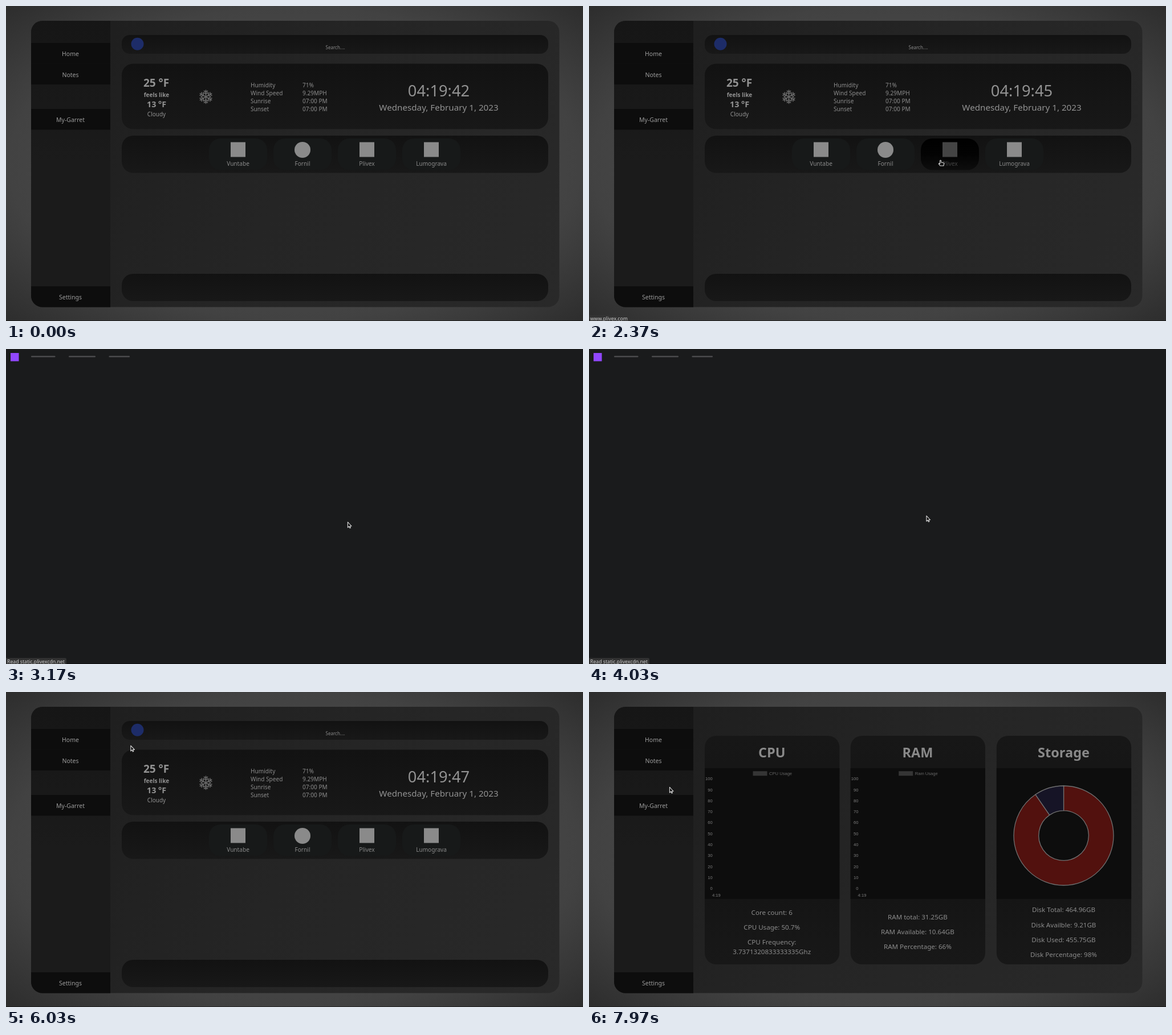
An HTML page with a canvas that plays this animation: 1012 px wide and 554 px high, repeating every 8000 ms.

```html
<!DOCTYPE html>
<html lang="en">
<head>
<meta charset="utf-8">
<title>Dashboard</title>
<style>
html, body { margin: 0; width: 100%; height: 100%; overflow: hidden; background: #333; }
canvas { display: block; }
</style>
</head>
<body>
<canvas id="stage" width="1012" height="554"></canvas>
<script>
const LOOP = 8000;
const SANS = '"Noto Sans", sans-serif';
const CHART = '"Liberation Sans", Arial, sans-serif';
const c = document.getElementById('stage').getContext('2d');

// Pointer stops: time, x, y
const PATH = [
  [230, 22, 262], [870, 660, 252], [1570, 660, 252], [1900, 640, 264],
  [2250, 616.5, 271], [2570, 616.5, 271], [2730, 599, 304], [3570, 599, 304],
  [4030, 591.5, 293], [4930, 591.5, 293], [5230, 430, 420], [5630, 250, 92],
  [5770, 250, 92], [5950, 226, 86], [6470, 109.5, 207], [7000, 109.5, 207],
  [7430, 143, 169], [7900, 143, 169], [7970, 141, 167]
];
const TICKS = [570, 1570, 2370, 4570, 5200, 6200];
const LINKS = ['Vuntabe', 'Fornil', 'Plivex', 'Lumograva'];
const NAV = [['Home', 65, 88], ['Notes', 101.5, 124.5], ['My-Garret', 181, 204], ['Settings', 493, 516]];

const lerp = (a, b, k) => a + (b - a) * k;
const ramp = (t, a, b) => Math.min(1, Math.max(0, (t - a) / (b - a)));
const easeOut = k => 1 - (1 - k) ** 4;
const inside = (p, x, y, w, h) => p.x >= x && p.x <= x + w && p.y >= y && p.y <= y + h;

function pointer(t) {
  const i = Math.max(1, PATH.findIndex(s => s[0] > t));
  const [a, b] = t >= 7970 ? [PATH.at(-1), PATH.at(-1)] : [PATH[i - 1], PATH[i]];
  const k = a === b ? 0 : ramp(t, a[0], b[0]), e = k * k * (3 - 2 * k);
  return { x: lerp(a[1], b[1], e), y: lerp(a[2], b[2], e) };
}

function vertical(y, h, ...colors) {
  const g = c.createLinearGradient(0, y, 0, y + h);
  colors.forEach((col, i) => g.addColorStop(i / (colors.length - 1), col));
  return g;
}

function box(x, y, w, h, r, fill) {
  c.beginPath();
  c.roundRect(x, y, w, h, r);
  c.fillStyle = fill;
  c.fill();
}

function disc(x, y, r, fill) {
  c.beginPath();
  c.arc(x, y, r, 0, 2 * Math.PI);
  c.fillStyle = fill;
  c.fill();
}

function text(s, x, y, size, color = '#929292', align = 'center', weight = 400, family = SANS) {
  c.font = `${weight} ${size}px ${family}`;
  c.textAlign = align;
  c.fillStyle = color;
  c.fillText(s, x, y);
}

function frame(p) {
  c.save();
  c.scale(1012, 554);
  const g = c.createRadialGradient(.5, .5, 0, .5, .5, .7071);
  g.addColorStop(0, '#555');
  g.addColorStop(.7, '#424242');
  g.addColorStop(1, '#2d2d2d');
  c.fillStyle = g;
  c.fillRect(0, 0, 1, 1);
  c.restore();

  const panel = c.createLinearGradient(44, 26, 970, 529);
  panel.addColorStop(0, '#1d1d1d');
  panel.addColorStop(.5, '#252525');
  panel.addColorStop(1, '#292929');
  box(44, 26, 926.5, 503.5, 20, panel);
  box(44, 26, 139, 503.5, [20, 0, 0, 20], vertical(26, 503, '#161616', '#1b1b1b', '#1b1b1b'));
  NAV.forEach(([label, y, base], i) => {
    const hot = inside(p, 44, y, 139, 36.5);
    box(44, y, 139, 36.5, i === 3 ? [0, 0, 0, 20] : 0,
      hot ? vertical(y, 36.5, '#000', '#020202', '#141414') : '#0d0d0d');
    text(label, 113, base, 10.5, '#9c9c9c');
  });
}

function snowflake(x, y) {
  c.save();
  c.translate(x, y);
  c.strokeStyle = '#666';
  c.lineWidth = 1.7;
  c.lineCap = 'round';
  c.beginPath();
  for (let i = 0; i < 6; i++) {
    c.moveTo(0, 0);
    c.lineTo(0, -11.6);
    for (const [d, s] of [[5, 3.6], [8.3, 3]]) {
      c.moveTo(-s, -d - s * .65);
      c.lineTo(0, -d);
      c.lineTo(s, -d - s * .65);
    }
    c.rotate(Math.PI / 3);
  }
  c.stroke();
  c.restore();
}

function home(t, p) {
  const bar = (y, h, r) => box(203, y, 748, h, r, vertical(y, h, '#121212', '#181818'));
  bar(51, 33, 14);
  disc(230.5, 66.7, 11, '#1d2c68');
  text('Search....', 577.5, 76, 8, '#8a8a8a');

  bar(101.5, 115, 20);
  text('25 °F', 263.5, 142, 19, '#929292', 'center', 700);
  text('feels like', 264, 159.5, 10, '#929292', 'center', 700);
  text('13 °F', 264, 178.3, 14.3, '#929292', 'center', 700);
  text('Cloudy', 264, 194, 10);
  snowflake(350.5, 159.7);
  [['Humidity', '71%'], ['Wind Speed', '9.29MPH'], ['Sunrise', '07:00 PM'], ['Sunset', '07:00 PM']]
    .forEach(([name, value], i) => {
      text(name, 429, 142.6 + 14 * i, 10.1, '#8c8c8c', 'left');
      text(value, 520, 142.6 + 14 * i, 10.1, '#8c8c8c', 'left');
    });
  const seconds = 42 + TICKS.filter(s => t >= s).length;
  text('04:19:' + seconds, 759, 159, 27.3);
  text('Wednesday, February 1, 2023', 759, 184.3, 15.2);

  bar(228, 65.5, 20);
  LINKS.forEach((name, i) => {
    const x = 407 + 113 * i;
    const hot = inside(p, x - 51, 233, 102, 55) && t < 4570;
    const color = hot && t >= 2250 ? '#444' : hot ? '#777' : '#8a8a8a';
    box(x - 51, 233, 102, 55.5, 20, hot ? vertical(233, 55, '#000', '#030303', '#0d0d0d') : '#171919');
    if (i === 1) disc(x, 253, 14, color);
    else box(x - 13, 239.5, 26, 26, 0, color);
    text(name, x, 280.6, 10.1, color);
  });
  bar(471, 48, 20);
}

function lineChart(x, label, loaded) {
  box(x + 84.5, 139.3, 25, 8, 0, '#353535');
  text(label, x + 113, 145.6, 7.6, '#666', 'left', 400, CHART);
  const step = loaded ? 19.3 : 20.4;
  for (let i = 0; i <= 10; i++)
    text(100 - 10 * i, x + 13.7, 155.2 + step * i, 7.6, '#7c7c7c', 'right', 400, CHART);
  if (loaded) text('4:19', x + 20.3, 359.6, 7.6, '#7c7c7c', 'center', 400, CHART);
}

function slice(from, to, fill) {
  const turn = k => (k - .25) * 2 * Math.PI;
  c.beginPath();
  c.arc(832.5, 252.5, 87.5, turn(from), turn(to));
  c.arc(832.5, 252.5, 43.8, turn(to), turn(from), true);
  c.closePath();
  c.fillStyle = fill;
  c.fill();
  c.strokeStyle = '#707070';
  c.lineWidth = 1.3;
  c.stroke();
}

function server(t) {
  const disk = t >= 7470, ram = t >= 7530, cpu = t >= 7590;
  const cards = [
    [203, 'CPU', cpu
      ? ['Core count: 6', 'CPU Usage: 50.7%', 'CPU Frequency:', '3.7371320833333335Ghz']
      : ['Core count:', 'CPU Usage: %', 'CPU Frequency: Ghz']],
    [458.7, 'RAM', ram
      ? ['RAM total: 31.25GB', 'RAM Available: 10.64GB', 'RAM Percentage: 66%']
      : ['RAM total: GB', 'RAM Available: GB', 'RAM Percentage: %']],
    [714.8, 'Storage', disk
      ? ['Disk Total: 464.96GB', 'Disk Availble: 9.21GB', 'Disk Used: 455.75GB', 'Disk Percentage: 98%']
      : ['Disk Total: GB', 'Disk Availble: GB', 'Disk Used: GB', 'Disk Percentage: %']]
  ];
  cards.forEach(([x, title, lines], n) => {
    const mid = x + 118;
    box(x, 77, 236.3, 402, 20, vertical(77, 402, '#171717', '#131313', '#181818'));
    box(x, 134, 236.3, 230, 0, '#0d0d0d');
    text(title, mid - .3, 115, 23.5, '#898989', 'center', 700);
    const wrapped = n === 0 && cpu;
    const top = n === 2 ? 387.4 : wrapped ? 392.2 : 400.2;
    lines.forEach((s, i) =>
      text(s, mid - .3, top + 26.1 * i - (wrapped && i === 3 ? 9.8 : 0), 11.6, '#8c8c8c'));
  });
  lineChart(203, 'CPU Usage', cpu);
  lineChart(458.7, 'Ram Usage', ram);

  const sweep = easeOut(ramp(t, 6613, 7613));
  const grown = .03 * ramp(t, 7600, 7630) + .34 * ramp(t, 7880, 7970);
  const red = lerp(.5, .98, easeOut(grown)) * sweep;
  slice(0, red, '#52110e');
  slice(red, sweep, '#161426');
}

function loading(t) {
  c.fillStyle = t < 3070 ? '#1c1b1f' : '#1a1b1c';
  c.fillRect(0, 0, 1012, 554);
  if (t < 3070) return;
  box(8, 7, 14.5, 14.5, 0, '#9147ff');
  for (const [x, w] of [[44, 42.5], [110, 47], [180.5, 36.5]]) box(x, 12, w, 2.6, 1.3, '#4a4a4c');
}

function status(s) {
  c.font = `8.7px ${SANS}`;
  box(0, 543.5, c.measureText(s).width + 5, 10.5, [0, 2, 0, 0], '#333');
  text(s, 2, 553.2, 8.7, '#ccc', 'left');
}

function drawPointer(p, hand) {
  const shape = hand
    ? 'M-1 5.4V1Q0-.6 1 1V4L5.4 4.8Q6.6 5.2 6.2 6.6L5.4 10H-.6L-3.2 6.6Q-3-.0 5.4 5.4Z'.replace('-3-.0 5.4 5.4', '-3 5.2 -1 6.6')
    : 'M.4.4V10L2.6 8 4 11 5.4 10.4 4.1 7.5H7Z';
  c.save();
  c.translate(p.x, p.y);
  const path = new Path2D(shape);
  c.fillStyle = '#111';
  c.fill(path);
  c.strokeStyle = '#ddd';
  c.lineWidth = 1.1;
  c.lineJoin = 'round';
  c.stroke(path);
  c.restore();
}

function draw(t) {
  const p = pointer(t);
  const away = t >= 2570 && t < 4570;
  if (away) loading(t);
  else {
    frame(t < 230 ? { x: -9, y: -9 } : p);
    if (t < 6630) home(t, p);
    else server(t);
  }
  c.fillStyle = 'rgba(0,0,0,.4)';
  c.fillRect(0, 553, 1012, 1);
  if (t >= 2250 && t < 4300) status(t < 2870 ? 'www.plivex.com' : 'Read static.plivexcdn.net');

  const onNav = NAV.some(n => inside(p, 44, n[1], 139, 36.5));
  const onLink = t < 6630 && LINKS.some((_, i) => inside(p, 356 + 113 * i, 233, 102, 55));
  const hand = !away && (onNav || onLink || (t >= 4570 && t < 4730));
  if (t >= 230) drawPointer(p, hand);
}

function tick() {
  draw(performance.now() % LOOP);
  requestAnimationFrame(tick);
}
tick();
</script>
</body>
</html>
```
